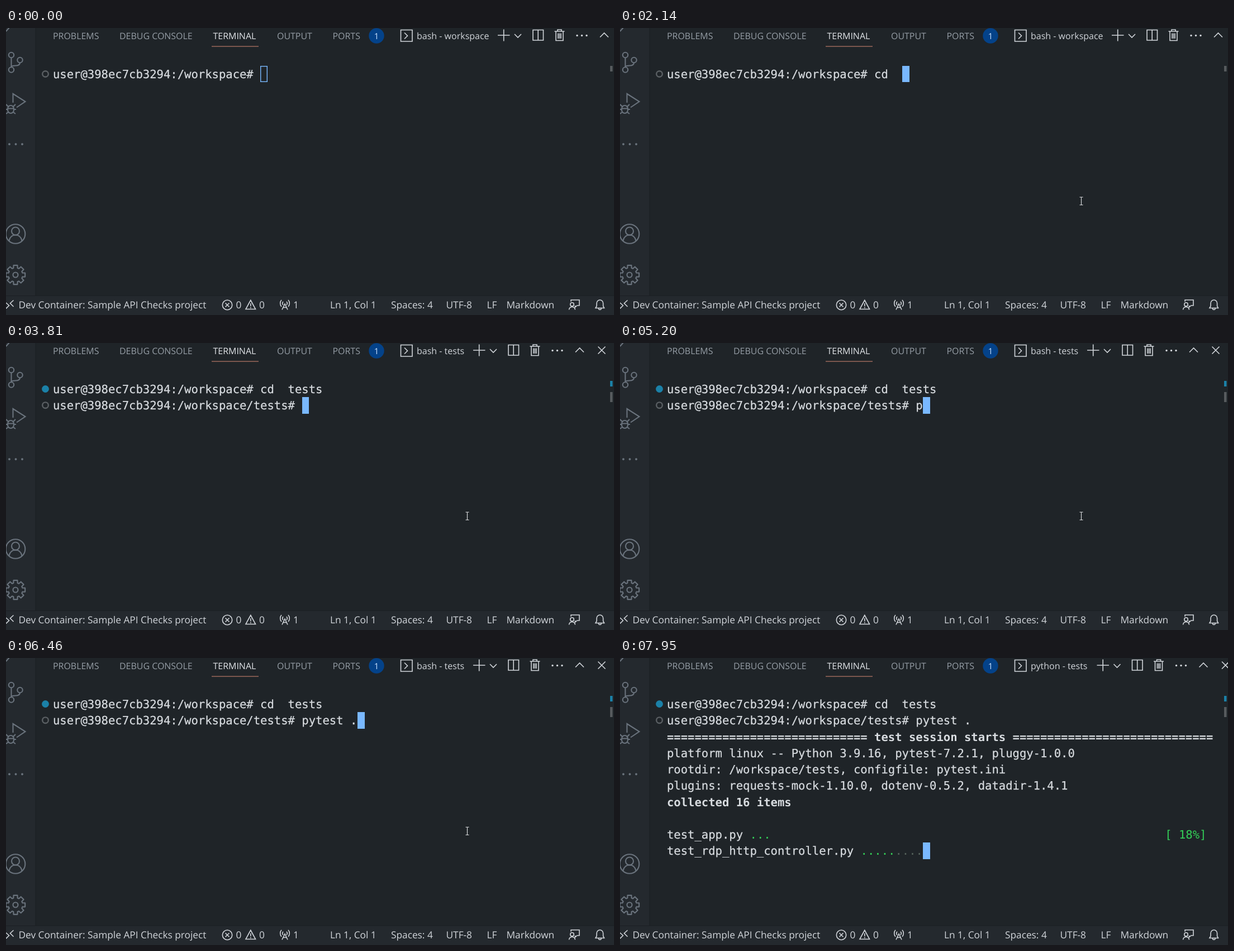
These frames come from a looping animation (1088x515 px, 8 s). An HTML page:

```html
<!DOCTYPE html>
<html lang="en">
<head>
<meta charset="utf-8">
<title>Terminal session</title>
<style>
  html, body { margin: 0; width: 100%; height: 100%; overflow: hidden; background: #1f2428; }
  svg { display: block; width: 1088px; height: 515px; }
  text { white-space: pre; text-rendering: geometricPrecision; }
  .ui { font: 16px "Open Sans", "Noto Sans", sans-serif; fill: #d1d5da; }
  .tab { font-size: 15.95px; fill: #959da5; }
  .status { font-size: 17.3px; }
  .term { font: 20.56px "DejaVu Sans Mono", monospace; fill: #d8dce0; stroke: #d8dce0; stroke-width: .25; }
  .bold { font-weight: 700; stroke: none; }
  .green { fill: #34d058; stroke: none; }
  .dim { fill: #56635c; stroke: none; }
  .line { fill: none; stroke: #d1d5da; stroke-width: 1.6; }
  .side { fill: none; stroke: #6a737d; stroke-width: 2.1; }
  .dots { fill: #d1d5da; }
</style>
</head>
<body>
<svg viewBox="0 0 1088 515">
  <rect width="1088" height="515" fill="#1f2428"/>
  <rect width="53" height="480" fill="#24292e"/>
  <path d="M53 0V480" stroke="#1b1f23"/>
  <rect y="480" width="1088" height="35" fill="#24292e"/>
  <path d="M0 480.5H1088" stroke="#1b1f23"/>

  <!-- activity bar -->
  <g class="side">
    <path d="M0 6L7 -2"/>
    <circle cx="9.5" cy="48.5" r="4.7"/>
    <circle cx="25" cy="57.5" r="4.7"/>
    <circle cx="9.5" cy="75" r="4.7"/>
    <path d="M9.5 53V70M25 62C25 67 21 67.5 17 67.5C13 67.5 10 68 9.5 70"/>
    <path d="M12.5 134V118L34.5 132L19 142.5"/>
    <path d="M3 145a5.5 6 0 0 1 11 0v2a5.5 6 0 0 1 -11 0zM3 144.5H14M0 137l4 4M17 137l-4 4M0 146H3M14 146H18M0 154l4 -3M17 154l-4 -3"/>
    <circle cx="17" cy="369.5" r="17.3"/>
    <circle cx="17" cy="364.5" r="7"/>
    <path d="M5.5 382C7 374 12 371.5 17 371.5S27 374 28.5 382"/>
    <path id="gear" stroke-linejoin="round"/>
    <circle cx="17" cy="443" r="4.5"/>
  </g>
  <g fill="#6a737d">
    <circle cx="6" cy="208.5" r="1.9"/><circle cx="17.5" cy="208.5" r="1.9"/><circle cx="29" cy="208.5" r="1.9"/>
  </g>

  <!-- panel header -->
  <g class="ui">
    <text class="tab" x="84" y="20">PROBLEMS</text>
    <text class="tab" x="203" y="20">DEBUG CONSOLE</text>
    <text class="tab" x="370.5" y="20" style="fill:#e1e4e8">TERMINAL</text>
    <text class="tab" x="485" y="20">OUTPUT</text>
    <text class="tab" x="584.5" y="20">PORTS</text>
    <circle cx="663" cy="14" r="13.7" fill="#044289"/>
    <text x="663" y="19.5" text-anchor="middle" style="fill:#c8e1ff;font-size:15px">1</text>
    <text id="title" x="735" y="20"></text>
  </g>
  <path d="M368 33H452" stroke="#d98a75" stroke-width="1.2"/>
  <path class="line" d="M706.5 3.5h20.5v20.5h-20.5zM713 8.5l5.5 5.5l-5.5 5.5"/>
  <g id="tools">
    <path class="line" d="M880 13H901.5M890.7 2.5V23.5M910 11l6 6l6 -6"/>
    <path class="line" d="M943 3.5h18.5v18.5h-18.5zM952.2 3.5V22"/>
    <path class="line" d="M981.5 6H999.5M987 6V3h7v3M984 6V22.5h13V6M988 9.5V19M990.5 9.5V19M993 9.5V19"/>
    <g class="dots"><circle cx="1022" cy="13.5" r="1.7"/><circle cx="1030.5" cy="13.5" r="1.7"/><circle cx="1039" cy="13.5" r="1.7"/></g>
    <path class="line" d="M1063 16.5l7.5 -7.5l7.5 7.5M1103.5 6.5l13 13m0 -13l-13 13"/>
  </g>

  <!-- status bar -->
  <g class="ui">
    <text class="status" x="22.5" y="503">Dev Container: Sample API Checks project</text>
    <text class="status" x="411.5" y="503">0</text>
    <text class="status" x="453" y="503">0</text>
    <text class="status" x="514" y="503">1</text>
    <text class="status" x="580" y="503">Ln 1, Col 1</text>
    <text class="status" x="689" y="503">Spaces: 4</text>
    <text class="status" x="787.5" y="503">UTF-8</text>
    <text class="status" x="860.5" y="503">LF</text>
    <text class="status" x="895.5" y="503">Markdown</text>
  </g>
  <g class="line">
    <path d="M0 493l5.5 5l-5.5 5.5M13.5 488.5l-6 5.5l6 6"/>
    <circle cx="396" cy="497" r="8.7"/>
    <path d="M392.5 493.5l7 7m0 -7l-7 7"/>
    <path d="M437.8 488.5L446.5 504.5H429zM437.8 494V499.5M437.8 501V502.8"/>
    <path d="M494 505.5L499 495L504 505.5M496 501.5H502M493 488a9 9 0 0 0 0 12M505 488a9 9 0 0 1 0 12M496 491a4.5 4.5 0 0 0 0 6M502 491a4.5 4.5 0 0 1 0 6"/>
    <path d="M1011 491V488H1026V498H1022L1018.5 501V498"/>
    <circle cx="1013" cy="496" r="3.2"/>
    <path d="M1007.5 505.5C1008 501.5 1010 500.5 1013 500.5S1018 501.5 1018.5 505.5"/>
    <path d="M1055 502.5L1057 499V494a5.8 6 0 0 1 11.6 0V499L1070.5 502.5ZM1060.5 503a2.3 2.5 0 0 0 4.6 0"/>
  </g>

  <g id="marks"></g>
  <g id="screen"></g>
  <g id="mouse"></g>
</svg>
<script>
const LOOP = 8000, LEFT = 84, TOP = 68, CELL = 12.378, ROW = 29.25;
const $ = id => document.getElementById(id);

const CD_TIMES = [1740, 1805, 1870, 2140, 2490, 2820, 3020, 3150, 3350];
const PYTEST_TIMES = [5200, 5470, 5570, 5670, 5770, 5870, 6130, 6460];
const FOCUS = 1070, CLICK_END = 1210, ENTER_CD = 3750, TITLE_TESTS = 3810;
const ENTER_PYTEST = 6790, TITLE_PYTHON = 7050;
const STARTED = 7520, COLLECTED = 7590, FIRST_FILE = 7660, FIRST_DOTS = 7730;
const SECOND_FILE = 7800, SECOND_DOTS = 7870, MORE_DOTS = 7950;

const typed = (text, times, t) => text.slice(0, times.filter(at => at <= t).length);

// Collects text runs by row and column; the cursor follows the last run.
function terminal(t) {
  const runs = [];
  let cursor;
  const put = (row, col, text, style = '') => {
    runs.push({ row, col, text, style });
    cursor = { row, col: col + text.length };
  };
  const prompt = 'user@398ec7cb3294:/workspace';
  put(0, 0, `${prompt}# ${typed('cd  tests', CD_TIMES, t)}`);
  if (t >= ENTER_CD) put(1, 0, `${prompt}/tests# ${typed('pytest .', PYTEST_TIMES, t)}`);
  if (t >= ENTER_PYTEST) cursor = { row: 2, col: 0 };
  if (t >= STARTED) {
    const rule = '='.repeat(29);
    put(2, 0, `${rule} test session starts ${rule}`, 'bold');
    put(3, 0, 'platform linux -- Python 3.9.16, pytest-7.2.1, pluggy-1.0.0');
    put(4, 0, 'rootdir: /workspace/tests, configfile: pytest.ini');
    put(5, 0, 'plugins: requests-mock-1.10.0, dotenv-0.5.2, datadir-1.4.1');
    put(6, 0, t < COLLECTED ? 'collecting ... ' : 'collected 16 items', 'bold');
  }
  if (t >= COLLECTED) cursor = { row: 8, col: 0 };
  if (t >= FIRST_FILE) put(8, 0, 'test_app.py ');
  if (t >= FIRST_DOTS) put(8, 12, '...', 'green');
  if (t >= SECOND_FILE) {
    put(8, 72, '[ 18%]', 'green');
    put(9, 0, 'test_rdp_http_controller.py ');
  }
  if (t >= SECOND_DOTS) put(9, 28, '.....', 'green');
  if (t >= MORE_DOTS) put(9, 33, '....', 'dim');
  return { runs, cursor };
}

// The cursor block snaps to whole pixels.
function drawCursor({ row, col }, focused) {
  const cellX = LEFT + col * CELL, cellY = TOP + row * ROW;
  const x = Math.round(cellX), y = Math.floor(cellY);
  const width = Math.ceil(cellX + CELL) - x, height = Math.ceil(cellY + 29) - y;
  return focused
    ? `<rect x="${x}" y="${y}" width="${width}" height="${height}" fill="#79b8ff"/>`
    : `<rect x="${x + .7}" y="${y + .7}" width="${width - 1.4}" height="${height - 1.4}" fill="none" stroke="#79b8ff" stroke-width="1.4"/>`;
}

function drawScreen(t) {
  const { runs, cursor } = terminal(t);
  return runs.map(r =>
    `<text class="term ${r.style}" x="${LEFT + r.col * CELL}" y="${TOP + 22 + r.row * ROW}">${r.text}</text>`
  ).join('') + drawCursor(cursor, t >= FOCUS);
}

function drawMarks(t) {
  const ring = y => `<circle cx="70.5" cy="${y}" r="5.3" fill="none" stroke="#5b6064" stroke-width="2.4"/>`;
  const bar = (y, h, color) => `<rect x="1081" y="${y}" width="4.5" height="${h}" fill="${color}"/>`;
  if (t < ENTER_CD) return ring(82.5) + bar(68, 10, '#575b5e');
  return '<circle cx="70.5" cy="82.5" r="6.4" fill="#1b81a8"/>' + ring(111.7) +
    bar(68, 10, '#1b81a8') + bar(88, 18, '#575b5e');
}

// The pointer enters from the status bar and eases to rest in 68 ms steps.
function drawMouse(t) {
  if (t < 130 || t >= SECOND_FILE) return '';
  const step = Math.min(10, Math.floor((t - 130) / 68));
  const left = (1 - step / 10) ** 2;
  const x = Math.round(825 + 198 * left) + .5, y = Math.round(310 + 184 * left) + .5;
  if (y > 479) {
    return `<path d="M${x} ${y}v16l4 -4l3 6.5l2.5 -1l-3 -6.5h5.5z" fill="#fff" stroke="#000" stroke-width=".8"/>`;
  }
  const click = t >= FOCUS && t < CLICK_END
    ? '<circle cx="823.5" cy="309.5" r="10" fill="#ff0" opacity=".45"/>' : '';
  return click + `<path d="M${x - 3} ${y - 7}h2.5l.5 .5l.5 -.5h2.5M${x} ${y - 6.5}v13M${x - 3} ${y + 7}h2.5l.5 -.5l.5 .5h2.5" fill="none" stroke="#d8dadc" stroke-width="1.2"/>`;
}

function gearPath() {
  const points = [];
  for (let tooth = 0; tooth < 8; tooth++) {
    for (const [turn, radius] of [[-.29, 12.8], [-.2, 17.5], [.2, 17.5], [.29, 12.8]]) {
      const angle = tooth * Math.PI / 4 + turn;
      points.push(`${17 + radius * Math.cos(angle)} ${443 + radius * Math.sin(angle)}`);
    }
  }
  return `M${points.join('L')}Z`;
}

const shown = {};
function update(id, markup) {
  if (shown[id] !== markup) $(id).innerHTML = shown[id] = markup;
}

function render() {
  const t = performance.now() % LOOP;
  const [title, shift] = t < TITLE_TESTS ? ['bash - workspace', 0]
    : t < TITLE_PYTHON ? ['bash - tests', -44] : ['python - tests', -26.5];
  update('title', title);
  $('tools').setAttribute('transform', `translate(${shift})`);
  update('marks', drawMarks(t));
  update('screen', drawScreen(t));
  update('mouse', drawMouse(t));
  requestAnimationFrame(render);
}

$('gear').setAttribute('d', gearPath());
render();
</script>
</body>
</html>
```
